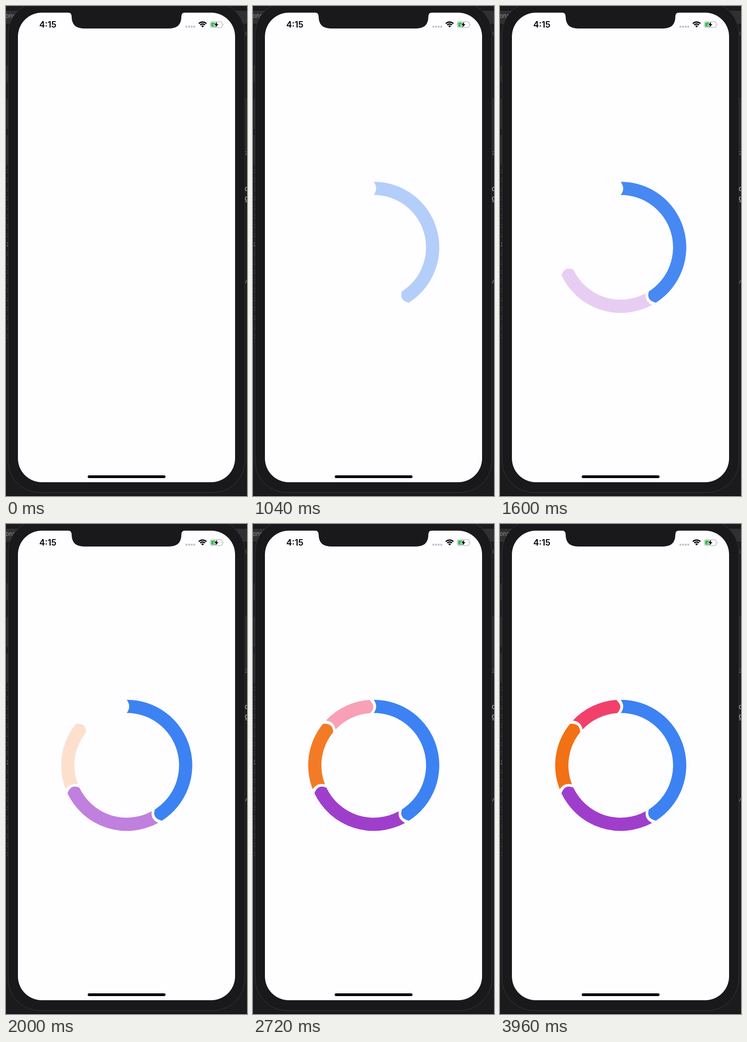
Animation, 525 px wide and 1067 px high, one loop 4000 ms. Source, as an HTML page:

```html
<!DOCTYPE html>
<html lang="en">
<head>
<meta charset="utf-8">
<title>Ring chart</title>
<style>
  html, body { margin: 0; width: 100%; height: 100%; overflow: hidden; background: #1b1b1d; }
  svg { display: block; width: 525px; height: 1067px; font-family: Inter, Roboto, sans-serif; }
</style>
</head>
<body>
<svg viewBox="0 0 525 1067">
  <!-- desktop behind the phone -->
  <rect width="525" height="1067" fill="#1b1b1d"/>
  <rect y="9" width="525" height="30" fill="#303032"/>
  <path d="M0 9.5H525M0 39.5H525" stroke="#101012"/>
  <path d="M0 128H6V167H0ZM0 201H6V269H0ZM0 280H6V347H0Z" fill="#2b2b2d" stroke="#101012"/>
  <rect x="519" y="200" width="6" height="115" fill="#28282a"/>
  <g fill="#919193" font-size="13">
    <text x="-1" y="26">ons</text>
    <text x="521" y="64" fill="#555">c</text>
    <text x="520" y="324" font-size="11" fill="#777">2</text>
    <text x="520" y="403" font-size="15" fill="#ccc">c</text>
    <text x="520" y="424" font-size="15" fill="#ccc">g</text>
    <text x="519" y="604" font-size="12" fill="#777">w</text>
  </g>
  <g id="lines" font-size="10"></g>
  <path d="M0 1066.5H525" stroke="#0c080f"/>

  <!-- phone -->
  <rect x="4.5" y="-9" width="516" height="1068.5" rx="70" fill="#19181b" stroke="#3a393c"/>
  <rect x="26" y="14.5" width="473" height="1022.5" rx="52" fill="#fefdff"/>
  <path d="M134 14Q143 14 143 23Q143 49 170 49H355Q382 49 382 23Q382 14 391 14Z" fill="#19181b"/>
  <rect x="178" y="1022" width="169.5" height="6" rx="3"/>

  <!-- status bar -->
  <text x="72.5" y="47" font-size="18.5" font-weight="600">4:15</text>
  <path d="M393 45h.2M398.8 45h.2M404.5 45h.2M410 45h.2" stroke="#c4c3c7" stroke-width="4.4" stroke-linecap="round"/>
  <g fill="none" stroke="#000" stroke-width="2.7">
    <path d="M420 38.2A11.8 11.8 0 0 1 436.6 38.2M423 41.2A7.6 7.6 0 0 1 433.6 41.2"/>
    <path d="M425.3 43.5Q428.3 41 431.3 43.5L428.3 46.7Z" fill="#000" stroke="none"/>
  </g>
  <rect x="445" y="34" width="26" height="13" rx="4" fill="none" stroke="#a09fa3"/>
  <path d="M473 38.5Q475 40.5 473 42.5Z" fill="#a09fa3"/>
  <rect x="446.7" y="35.7" width="10.5" height="9.6" rx="2.4" fill="#30c24f"/>
  <path d="M460.3 34L453.6 41.6H457.5L456 47.3L462.7 39.4H458.8Z" stroke="#fefdff" stroke-width="2.4" paint-order="stroke"/>

  <g id="ring"></g>
  <path id="cursor" d="M0 0V16L3.7 12.6L6.2 18.2L9 17L6.6 11.5H11.6Z" stroke="#fff" stroke-width="1.3"/>
</svg>
<script>
const LOOP = 4000, FADE = 1000, GAP = 3.9;
const CENTER = { x: 263, y: 525.5 }, OUTER = 142.8, INNER = 114, MIDDLE = 128.4;

const segments = [
  { from: 0, to: 151.4, color: '#3d82f3', start: 655 },
  { from: 151.4, to: 248.6, color: '#a03ecc', start: 1350 },
  { from: 248.6, to: 313.1, color: '#f27114', start: 1795 },
  { from: 313.1, to: 360, color: '#f1416a', start: 2230 }
];

const clamp = v => Math.min(1, Math.max(0, v));

function addTo(parent, tag, attrs) {
  const el = document.createElementNS('http://www.w3.org/2000/svg', tag);
  for (const name in attrs) el.setAttribute(name, attrs[name]);
  return parent.appendChild(el);
}

// Clockwise degrees from twelve o'clock
function polar(radius, degrees) {
  const a = degrees * Math.PI / 180;
  return `${(CENTER.x + radius * Math.sin(a)).toFixed(2)} ${(CENTER.y - radius * Math.cos(a)).toFixed(2)}`;
}

// Ring band with a hollow start and a bulging end
function band(from, to) {
  const large = to - from > 180 ? 1 : 0;
  return `M${polar(OUTER, from)}A${OUTER} ${OUTER} 0 ${large} 1 ${polar(OUTER, to)}` +
    `Q${polar(MIDDLE, to + 7)} ${polar(INNER, to)}` +
    `A${INNER} ${INNER} 0 ${large} 0 ${polar(INNER, from)}` +
    `Q${polar(MIDDLE, from + 4.8)} ${polar(OUTER, from)}Z`;
}

const ring = document.getElementById('ring');
const cursor = document.getElementById('cursor');
const lines = document.getElementById('lines');

for (const s of segments) {
  s.el = addTo(ring, 'path', { d: band(s.from, s.to - GAP), fill: s.color });
}
for (let y = 363; y < 730; y += 20) {
  addTo(lines, 'text', { x: 1.5, y, fill: y === 523 ? '#ccc' : '#555' }).textContent = '2';
}

function draw() {
  const t = performance.now() % LOOP;
  for (const s of segments) s.el.setAttribute('opacity', clamp((t - s.start) / FADE));

  const leave = clamp((t - 3120) / 220) ** 2;
  cursor.setAttribute('visibility', t >= 2920 && t < 3340 ? 'visible' : 'hidden');
  cursor.setAttribute('transform', `translate(${244.3 + 284 * leave} ${625.5 - 220 * leave})`);
  requestAnimationFrame(draw);
}
draw();
</script>
</body>
</html>
```
